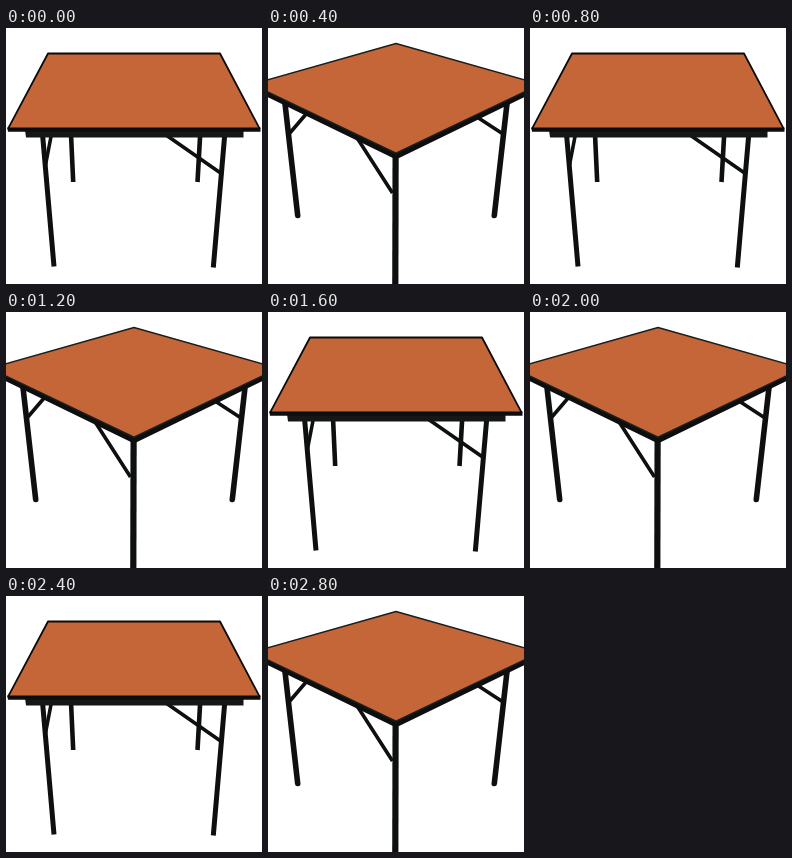
An HTML page without scripts that plays this animation: 256 by 256 pixels, repeating every 3.2 s.

```html
<!DOCTYPE html>
<html lang="en">
<head>
<meta charset="utf-8">
<title>Turning table</title>
<style>
  html, body { margin: 0; width: 100%; height: 100%; overflow: hidden; background: #fff; }
  svg { display: block; width: 100vw; height: 100vh; }
  .top { fill: #c46637; stroke: #0b0b0b; stroke-width: 1.8; stroke-linejoin: round; }
  .rim { fill: #0d0e0e; }
  .apron { fill: #151717; }
  .leg { fill: none; stroke: #0e1010; stroke-width: 5; }
  .back { stroke-width: 4.6; }
  .brace { stroke-width: 3.6; }
  .corner .top { stroke: #1c1e1e; stroke-width: 1.5; }
  .corner .post { stroke-width: 5.6; stroke-linecap: round; }
  .corner .front { stroke-width: 6.2; }

  /* each eighth of a turn swaps the two views */
  .view { animation: swap 800ms step-end infinite; }
  .corner { animation-delay: -400ms; }
  @keyframes swap {
    0% { visibility: visible; }
    50%, 100% { visibility: hidden; }
  }
</style>
</head>
<body>
<svg viewBox="0 0 256 256">
  <g class="view side">
    <path class="leg back" d="M65 106L67.2 154M194.2 106L191.5 154"/>
    <path class="leg brace" d="M45.5 106L39.5 137M160 107L216 146"/>
    <path class="leg" d="M36.5 106L48 238.5M218.8 106L207.3 239.5"/>
    <path class="apron" d="M19 102H237.5V109.5H20Z"/>
    <path class="rim" d="M1.2 99.5H254.5V103.8H2Z"/>
    <path class="top" d="M42 25.5H214L253.5 100.3H2.2Z"/>
  </g>
  <g class="view corner">
    <path class="leg brace" d="M21 106L39 85M88.5 109L124.5 165M209 89L235 106"/>
    <path class="leg post" d="M16.6 72L29.7 187.5M239.4 72L226.3 187.5"/>
    <path class="leg front" d="M127.6 126L127.3 258"/>
    <path class="rim" d="M-16 56L128 125L272 56V61.5L128 131.4L-16 61.5Z"/>
    <path class="top" d="M128 15.5L272 56.3L128 125.3L-16 56.3Z"/>
  </g>
</svg>
</body>
</html>
```
